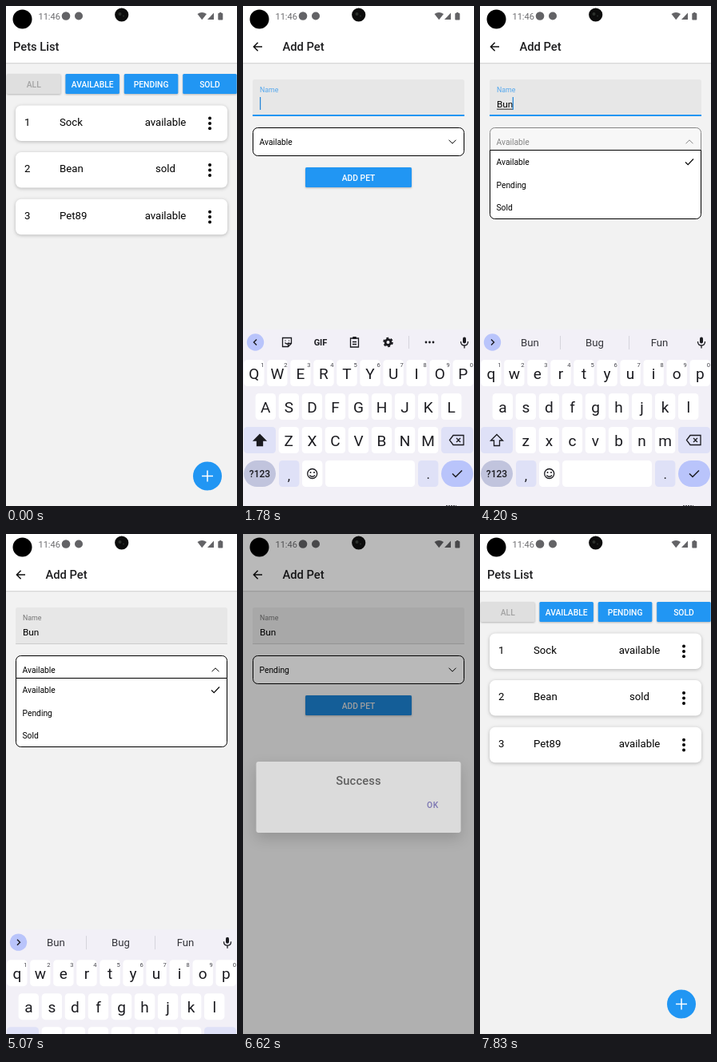
Animation, 289 px wide and 626 px high, one loop 8000 ms. Source, as an HTML page:

```html
<!DOCTYPE html>
<html lang="en">
<head>
<meta charset="utf-8">
<title>Pets List</title>
<style>
  html, body { margin: 0; width: 100%; height: 100%; overflow: hidden; background: #f2f2f2; }
  svg { display: block; width: 100vw; height: 100vh; font-family: Roboto, sans-serif; }
  #list, #add { transform-origin: 144.5px 313px; }
  .card { filter: drop-shadow(0 1.5px 2px rgba(0, 0, 0, .25)); }
  .raised { filter: drop-shadow(0 1px 1px rgba(0, 0, 0, .25)); }
  .dialog { filter: drop-shadow(0 7px 9px rgba(0, 0, 0, .3)); }
</style>
</head>
<body>
<svg id="stage" viewBox="0 0 289 626"></svg>
<script>
const LOOP = 8000;
const BLUE = '#2196f3', INK = '#1b1b20', GREY = '#636366', ACCENT = '#b9c4fb', SOFT = '#dfe1f7';

// Markup helpers
const rect = (x, y, w, h, fill, r = 0, extra = '') =>
  `<rect x="${x}" y="${y}" width="${w}" height="${h}" rx="${r}" fill="${fill}" ${extra}/>`;
const circle = (x, y, r, fill, extra = '') => `<circle cx="${x}" cy="${y}" r="${r}" fill="${fill}" ${extra}/>`;
const line = (d, stroke = INK, w = 1.3, extra = '') =>
  `<path d="${d}" fill="none" stroke="${stroke}" stroke-width="${w}" ${extra}/>`;
const shape = (d, fill) => `<path d="${d}" fill="${fill}"/>`;
const text = (x, y, s, size, fill = '#000', extra = '') =>
  `<text x="${x}" y="${y}" font-size="${size}" fill="${fill}" ${extra}>${s}</text>`;
const MID = 'text-anchor="middle"', MEDIUM = 'font-weight="500"';
const group = (id, body) => `<g id="${id}">${body}</g>`;

const button = (x, y, w, h, label, fill = BLUE, color = '#fff') =>
  rect(x, y, w, h, fill, 1.5, 'class="raised"') +
  text(x + w / 2, y + h / 2 + 4, label, 10.3, color, `${MID} ${MEDIUM}`);

const page = (title, x) =>
  rect(-30, -60, 349, 746, '#f2f2f2') +
  rect(0, 71, 289, 1, '#d8d8d8') + rect(0, 72, 289, 1, '#e9e9e9') + rect(0, 0, 289, 71, '#fff') +
  text(x, 56, title, 14.7, '#1c1c1e', MEDIUM);

function listScreen() {
  const filters = ['ALL', 'AVAILABLE', 'PENDING', 'SOLD'].map((label, i) =>
    button(1 + i * 73.4, 85, 67.5, 25, label, i ? BLUE : '#dfdfdf', i ? '#fff' : '#a3a3a3'));
  const pets = [['Sock', 'available'], ['Bean', 'sold'], ['Pet89', 'available']];
  const rows = pets.map(([name, status], i) => {
    const y = 124.5 + i * 58.6;
    return rect(12, y, 265, 44.5, '#fff', 7, 'class="card"') +
      text(23, y + 25, i + 1, 13.2) + text(67, y + 25, name, 13.2) +
      text(199.5, y + 25, status, 13.2, '#000', MID) +
      [16, 22.4, 28.8].map(dy => circle(255, y + dy, 2, '#000')).join('');
  });
  const fab = circle(252, 588.5, 18, BLUE) + line('M245 588.5h14M252 581.5v14', '#fff', 1.5);
  return page('Pets List', 9) + filters.join('') + rows.join('') + group('fab', fab);
}

function addScreen() {
  const field = rect(12, 92, 265, 46, '#e7e7e7', 2.5) +
    rect(12, 137, 265, .8, '#c6c6c6') + rect(12, 136, 265, 2, BLUE, 0, 'id="focusLine"') +
    text(21, 0, 'Name', 11.8, '#777', 'id="label"') + text(21, 127, '', 11.8, '#000', 'id="value"') +
    rect(21, 128.7, 0, .9, '#111', 0, 'id="underline"') + rect(40.5, 114, 1.2, 16, '#1f84d8', 0, 'id="caret"');
  const select = rect(12.5, 152.5, 264, 35, '#fff', 6, 'stroke="#000"') +
    text(20.5, 173.7, 'Available', 10.3, '#000', 'id="choice"') + line('', '#000', 1, 'id="chevron"');
  const options = ['Available', 'Pending', 'Sold'].map((s, i) =>
    text(20.5, 199.2 + i * 28.4, s, 10.3, '#000', `id="option${i}"`)).join('');
  const menu = '<path d="M12.5 180.5H276.5V260.5a6 6 0 0 1-6 6H18.5a6 6 0 0 1-6-6Z" fill="#fff" stroke="#000"/>' +
    options + line('M257 195.5l3.2 3.2L267 191.5', '#000', 1.1);
  return page('Add Pet', 49.5) + line('M24 51H13.5M18.6 45.8L13.4 51L18.6 56.2', '#111', 1.5) +
    field + button(78, 202, 133, 25, 'ADD PET') +
    rect(78, 202, 133, 25, '#000', 1.5, 'id="press"') + group('select', select) + group('menu', menu);
}

function keyboard() {
  const key = (x, y, w, fill = '#fff', r = 4.5) => rect(x, y, w, 33, fill, r);
  const letters = [['QWERTYUIOP', 13.8, 443], ['ASDFGHJKL', 28.3, 485], ['ZXCVBNM', 57.3, 527]]
    .map(([row, x0, y]) => [...row].map((c, i) => {
      const x = x0 + i * 29.05;
      const digit = y === 443 ? text(x + 10.5, y + 8.5, (i + 1) % 10, 7.5, '#44444c', MID) : '';
      return key(x - 12.7, y, 25.4) + text(x, y + 24, c, 19, INK, `${MID} class="letter"`) + digit;
    }).join('')).join('');
  const special = key(1, 527, 40, SOFT) + key(248, 527, 40, SOFT) +
    `<path id="shift" d="M21 536.5l7.5 7.5h-4v6.500h-7v-6.500h-4z" stroke="${INK}" stroke-width="1.3"/>` +
    line('M258.500 543.500l4.500-6h13v12h-13zM267 541l5 5m0-5l-5 5') +
    key(1, 569, 40, '#c1c4dd', 16.5) + text(21, 590, '?123', 12, INK, `${MID} ${MEDIUM}`) +
    key(45, 569, 25.4, SOFT) + text(57.5, 594, ',', 17, INK, MID) +
    key(74, 569, 25.4) + circle(86.7, 585.5, 6, 'none', `stroke="${INK}" stroke-width="1.3"`) +
    circle(84.5, 584, 1, INK) + circle(89, 584, 1, INK) + line('M83.300 587.500q3.400 3.500 6.800 0') +
    key(103, 569, 112) + key(219, 569, 25.4, SOFT) + text(231.700, 592, '.', 17, INK, MID) +
    key(248, 569, 40, ACCENT, 16.5) + line('M262 585.500l4 4L274 581.500', INK, 1.5) +
    line('M254 625.500h13', '#55555c', 1, 'stroke-dasharray="2 1"');
  const tools = line('M49.500 415.500h11v7l-4 4h-7zM60.500 422.500h-4v4M52.500 421.500q2.500 3 5 0M53 418.500v1M57.500 418.500v1') +
    text(97, 425, 'GIF', 11, INK, `${MID} font-weight="700"`) +
    line('M134.500 416h10v11h-10zM137 420.500h5M137 423.500h5') + rect(137, 414, 5, 3, INK, 1) +
    circle(181.500, 421, 3.4, 'none', `stroke="${INK}" stroke-width="2.8"`) +
    circle(181.500, 421, 5.3, 'none', `stroke="${INK}" stroke-width="2" stroke-dasharray="2.800 2.750"`) +
    line('M207.500 413v16', '#d5d4dc', 1) + [229, 233.5, 238].map(x => circle(x, 421, 1.4, INK)).join('');
  const words = [62.5, 143.5, 224.5].map((x, i) =>
    text(x, 426, '', 13.2, '#34343a', `${MID} id="word${i}"`)).join('') +
    line('M100.500 413v17M186.500 413v17', '#d5d4dc', 1);
  const mic = rect(275, 414.5, 4, 8, INK, 2) + line('M272.500 420q0 5 4.500 5t4.500-5M277 425v3.500');
  return rect(0, 405, 289, 221, '#f2f0f7') + circle(15.5, 421, 10.7, ACCENT) + line('', INK, 1.4, 'id="expand"') +
    group('tools', tools) + group('words', words) + mic + letters + special;
}

const statusBar = text(40.5, 16.7, '11:46', 11, '#6c6c6f') + circle(75, 12.5, 5.3, GREY) + circle(91, 12.5, 5, GREY) +
  shape('M239.500 10Q245 6 251 10L245.200 17.200Z', GREY) + shape('M252 17h8V8.500Z', GREY) +
  rect(265.3, 9, 6, 8.5, GREY, .8) + rect(267, 8, 2.5, 1.5, GREY);

const dialog = rect(16.5, 285, 256, 89, '#fff', 3, 'class="dialog"') +
  text(144.5, 314.4, 'Success', 14.7, '#212121', `${MID} ${MEDIUM} letter-spacing=".15"`) +
  text(230, 342.8, 'OK', 10.3, '#5046b4', `${MEDIUM} letter-spacing=".7"`);

const cutouts = circle(20.5, 16.5, 12, '#000') + circle(144.7, 11, 8.6, '#0c0c0c') +
  circle(142.5, 10, 2, '#2c302c') + circle(147, 12.5, 1, '#262b28');

const stage = document.getElementById('stage');
stage.innerHTML = group('list', listScreen()) + group('add', addScreen()) + group('keys', keyboard()) +
  group('status', statusBar) + rect(0, 0, 289, 626, '#000', 0, 'id="dim"') + group('dialog', dialog) + cutouts;

const el = {};
stage.querySelectorAll('[id]').forEach(node => el[node.id] = node);
const letterNodes = [...stage.querySelectorAll('.letter')];

const set = (id, attrs) => { for (const k in attrs) el[id].setAttribute(k, attrs[k]); };
const show = (id, on) => set(id, { opacity: +on });
const ramp = (t, a, b) => Math.min(1, Math.max(0, (t - a) / (b - a)));
const easeOut = (x, power = 3) => 1 - (1 - x) ** power;
const within = (t, a, b) => t >= a && t < b;
const mix = (a, b, x) => a + (b - a) * x;

function drawNavigation(t) {
  const forward = easeOut(ramp(t, 600, 850), 1.8), back = easeOut(ramp(t, 7570, 7830), 1.8);
  const progress = forward - back;
  el.list.style.transform = `scale(${1 + .15 * progress})`;
  el.add.style.transform = `scale(${.85 + .15 * progress})`;
  show('add', ramp(t, 745, 830) - ramp(t, 7600, 7690));
  show('fab', within(t, 380, 850) ? .92 : 1);
}

function drawField(t) {
  const focused = within(t, 1370, 4950);
  const lift = easeOut(ramp(t, 1370, 1520), 2);
  set('label', { y: mix(119.3, 108.2, lift), 'font-size': mix(11.8, 8.8, lift), fill: focused ? '#55a8ee' : '#777' });
  show('focusLine', focused);

  const typed = 'Bun'.slice(0, (t >= 2150) + (t >= 2550) + (t >= 2580));
  el.value.textContent = typed;
  set('caret', { x: [21, 28.6, 35, 40.7][typed.length] });
  show('caret', within(t, 1400, 4950) && !within(t, 3250, 3730) && !within(t, 4250, 4770));
  set('underline', { width: !focused ? 0 : t >= 2760 ? 20 : t >= 2550 ? 13.5 : t >= 2150 ? 7 : 0 });
}

function drawSelect(t) {
  const open = within(t, 4120, 5670);
  show('menu', open);
  show('select', 1 - .8 * (ramp(t, 3960, 4110) - ramp(t, 4120, 4380)));
  el.choice.textContent = t >= 5670 ? 'Pending' : 'Available';
  set('chevron', { d: open ? 'M257.500 172.300l4.500-4.500l4.500 4.500' : 'M257.500 167.700l4.500 4.500l4.500-4.500' });
  show('option1', t < 5530 ? 1 : .3);
}

function drawKeyboard(t) {
  const up = easeOut(ramp(t, 1450, 1780)) - ramp(t, 4950, 5170) ** 1.5;
  set('keys', { transform: `translate(0 ${221 * (1 - up)})` });
  const lower = t >= 2150;
  for (const node of letterNodes) {
    const c = node.textContent;
    node.textContent = lower ? c.toLowerCase() : c.toUpperCase();
  }
  set('shift', { fill: lower ? 'none' : INK });
  const suggest = ramp(t, 2230, 2390);
  show('tools', 1 - suggest);
  show('words', suggest);
  set('expand', { d: suggest ? 'M14 417.500l3.500 3.500l-3.500 3.500' : 'M17 417.500l-3.500 3.500l3.500 3.500' });
  const words = t >= 2760 ? 'Bun Bug Fun' : t >= 2550 ? 'Bu But Bus' : 'B But By';
  words.split(' ').forEach((word, i) => el['word' + i].textContent = word);
}

function drawDialog(t) {
  show('press', .14 * (ramp(t, 6250, 6400) - ramp(t, 6700, 7020)));
  const shown = easeOut(ramp(t, 6560, 6820)) - easeOut(ramp(t, 7480, 7700));
  show('dim', .5 * shown);
  show('dialog', shown);
}

function frame(now) {
  const t = now % LOOP;
  for (const draw of [drawNavigation, drawField, drawSelect, drawKeyboard, drawDialog]) draw(t);
  requestAnimationFrame(() => frame(performance.now() - start));
}
const start = performance.now();
frame(0);
</script>
</body>
</html>
```
